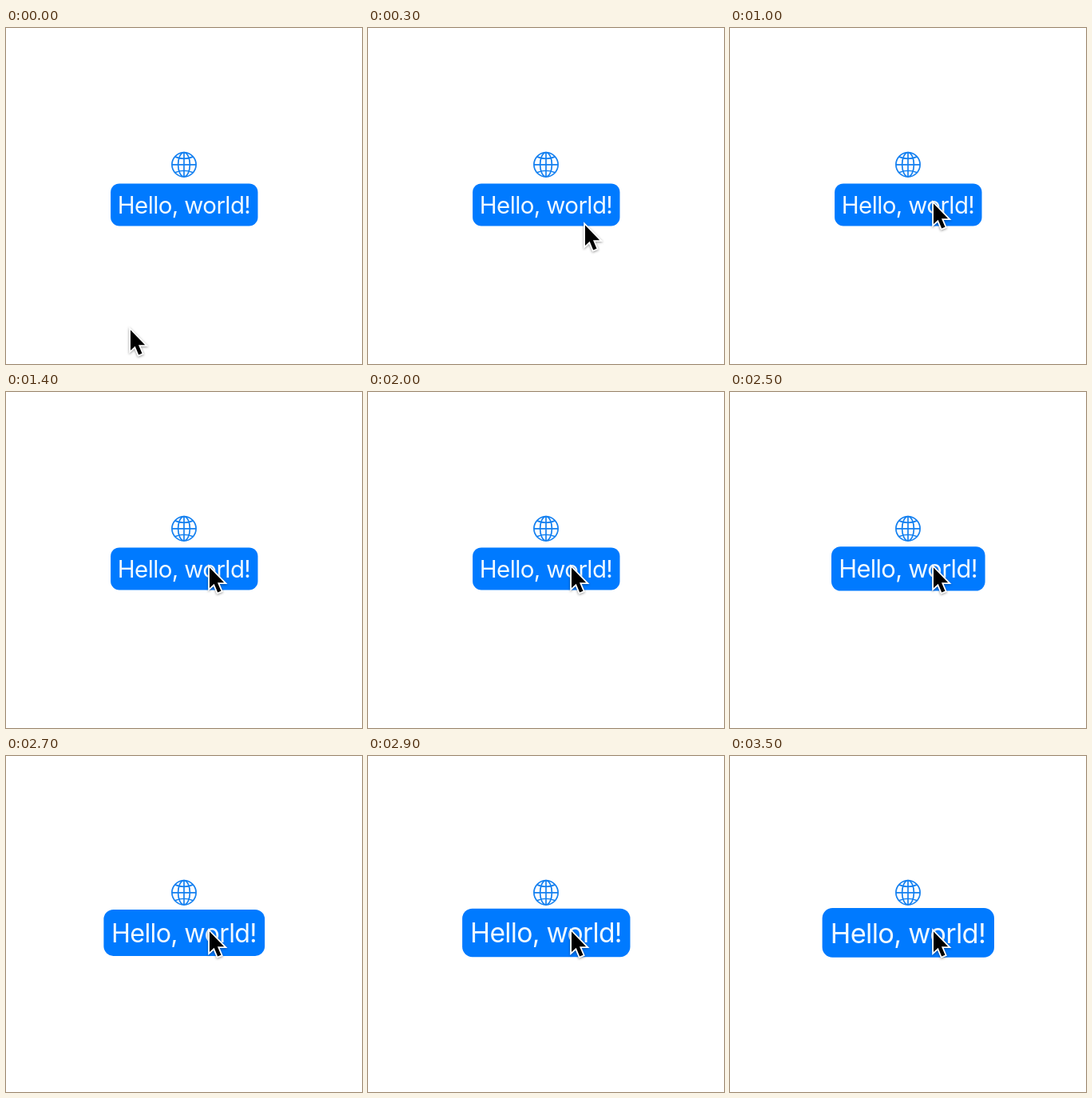
Write an HTML page that moves like this. It is 446 by 420 pixels and loops after 3.98 s.

```html
<!DOCTYPE html>
<html lang="en">
<head>
<meta charset="utf-8">
<title>Growing button</title>
<style>
  html, body { margin: 0; width: 100%; height: 100%; overflow: hidden; background: #fff; }
  svg { display: block; }
  text {
    font: 400 29.5px Inter, "Liberation Sans", sans-serif;
    font-optical-sizing: none;
    letter-spacing: -.62px;
  }
  #cursor { filter: drop-shadow(0 1.5px 1.5px rgba(0, 0, 0, .4)); }
</style>
</head>
<body>
<svg width="446" height="420" viewBox="0 0 446 420">
  <g fill="none" stroke="#1480f0" stroke-width="1.7" transform="translate(223 170.8)">
    <circle r="15.1"/>
    <ellipse rx="7.4" ry="15.1"/>
    <path d="M0-15.1V15.1M-15.1 0H15.1M-11.4-9.9Q0-5 11.4-9.9M-11.4 9.9Q0 5 11.4 9.9"/>
  </g>
  <g id="button">
    <rect x="-92.2" y="-26.5" width="184.4" height="53" rx="11" fill="#007aff"/>
    <text x="-.3" y="10.8" text-anchor="middle" fill="#f0f9ff">Hello, world!</text>
  </g>
  <g id="cursor">
    <path d="M0 .6V25.9L5.7 20.8L10.2 31.5L14.5 29.7L10 19.2H18.2Z"
      stroke="#fff" stroke-width="3.6" paint-order="stroke"/>
  </g>
</svg>
<script>
  const LOOP = 3980, STEP = 100;
  const path = [[156, 377], [185, 345], [237, 287], [272, 246], [270, 231], [260, 222], [255, 219]];
  const button = document.getElementById("button");
  const cursor = document.getElementById("cursor");
  const smooth = x => x * x * (3 - 2 * x);
  const clamp = x => Math.min(1, Math.max(0, x));

  function draw(now) {
    const step = Math.floor(now % LOOP / STEP);
    const [x, y] = path[Math.min(step, path.length - 1)];
    // The button grows for about one second from 2170 ms.
    const scale = 1 + .168 * smooth(clamp((step * STEP - 2170) / 980));
    cursor.setAttribute("transform", `translate(${x} ${y})`);
    button.setAttribute("transform", `translate(223.3 220.9) scale(${scale})`);
    requestAnimationFrame(() => draw(performance.now()));
  }
  draw(performance.now());
</script>
</body>
</html>
```
